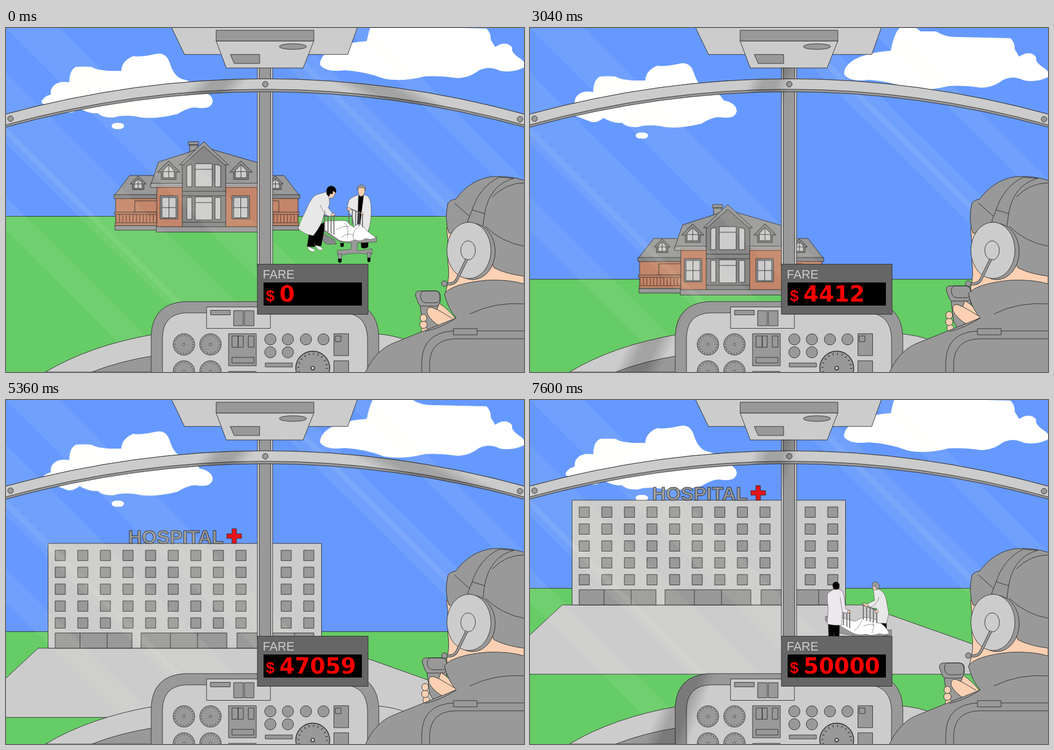
These frames come from a looping animation (917x611 px, 7680 ms). An HTML page without scripts:

```html
<!DOCTYPE html>
<html lang="en">
<head>
<meta charset="utf-8">
<title>Air ambulance fare</title>
<style>
@property --n { syntax: "<integer>"; inherits: true; initial-value: 0; }
html, body { margin: 0; width: 100%; height: 100%; overflow: hidden; background: #69f; }
svg { position: absolute; left: 0; top: 0; }
.ln { stroke: #2b2b2b; stroke-width: .9; stroke-linejoin: round; }
.fine { stroke-width: .5; }
.l { fill: #ccc; } .m { fill: #999; } .d { fill: #888; } .n { fill: none; }
.brick { fill: #c4866a; } .skin { fill: #fbd0b3; } .coat { fill: #e8e8e8; } .k { fill: #000; }
.rail { fill: none; stroke: #6a6a6a; stroke-width: 1.7; }
.label { font: 21.5px "Liberation Sans", Arial, sans-serif; fill: #ccc; }
.sign { font: bold 34px "Liberation Sans", Arial, sans-serif; }
.cash { font: bold 28px "Liberation Sans", Arial, sans-serif; fill: red; }
.num {
  position: absolute; left: 484px; top: 453px; color: red;
  font: bold 39px/39px "DejaVu Sans", sans-serif; counter-reset: n var(--n);
}
.num::after { content: counter(n); }

.num, #clouds, #home, #dest, #load, #unload, #rotor, #grip, #hand {
  animation: 7.68s linear -2ms infinite;
}
.num { animation-name: fare; }
#clouds { animation-name: clouds; }
#home { animation-name: leave; }
#dest { animation-name: arrive; }
#load { animation-name: load; }
#unload { animation-name: unload; }
#rotor { animation-name: spin; }
#grip { animation-name: pull; --dx: 12px; --dy: -9px; }
#hand { animation-name: pull; --dx: 3px; --dy: -5px; }

@keyframes fare {
  0%, 36.4583% { --n: 0; animation-timing-function: steps(34); }
  71.875%, 100% { --n: 50000; }
}
@keyframes clouds {
  0%, 34.375% { transform: translateY(0); animation-timing-function: cubic-bezier(.3, 0, .75, .85); }
  46.875% { transform: translateY(53px); animation-timing-function: steps(13); }
  60.4167% { transform: translateY(75px); }
  62.5% { transform: translateY(77px); animation-timing-function: cubic-bezier(.3, .2, .5, 1); }
  73.4375%, 100% { transform: translateY(0); }
}
@keyframes leave {
  0%, 34.375% { transform: translateY(0); animation-timing-function: cubic-bezier(.45, 0, .8, .8); }
  45.8333%, 100% { transform: translateY(430px); }
}
@keyframes arrive {
  0%, 62.5% { transform: translateY(470px); animation-timing-function: cubic-bezier(.2, .2, .55, 1); }
  73.9583%, 100% { transform: translateY(0); }
}
@keyframes load {
  0% { transform: translate(0, 0) scale(1); animation-timing-function: steps(10); }
  10.4167% { transform: translate(-175px, -132px) scale(1.458); animation-timing-function: steps(6); }
  16.6667% { transform: translate(-337px, -253px) scale(1.88); animation-timing-function: steps(14); }
  31.25%, 100% { transform: translate(-708px, -531px) scale(2.848); }
}
@keyframes unload {
  0%, 73.9583% { transform: translate(-705px, -649px) scale(2.867); animation-timing-function: steps(24); }
  98.9583%, 100% { transform: translate(0, 0) scale(1); }
}
@keyframes spin {
  0%, 21.875% { transform: rotate(-54deg); animation-timing-function: cubic-bezier(.5, 0, .8, .6); }
  31.25% { transform: rotate(-182deg); animation-timing-function: steps(15); }
  46.875% { transform: rotate(-648deg); animation-timing-function: steps(13); }
  60.4167% { transform: rotate(-1021deg); animation-timing-function: cubic-bezier(.2, .4, .6, 1); }
  72.9167%, 100% { transform: rotate(-1244deg); }
}
@keyframes pull {
  0%, 32.2917% { transform: translate(0, 0); }
  35.4167%, 70.8333% { transform: translate(var(--dx), var(--dy)); }
  73.9583%, 100% { transform: translate(0, 0); }
}
</style>
</head>
<body>
<svg width="917" height="611" viewBox="0 0 917 611">
<defs>
  <pattern id="panes" x="86" y="189" width="40" height="30" patternUnits="userSpaceOnUse">
    <rect class="m ln" x="1" y="1" width="18" height="18.5"/>
  </pattern>
  <g id="dial">
    <circle class="m ln" r="19"/>
    <circle class="n" r="16" stroke="#333" stroke-width="2.4" stroke-dasharray=".8 4.23"/>
    <circle class="l ln" r="2"/>
  </g>
  <circle id="knob" class="m ln" r="10"/>
  <g id="wing" class="ln">
    <path class="brick" d="M194 302h75v50h-75z"/>
    <path class="n" d="M228 307h40v20h-40z"/>
    <path class="m" d="M192 297L219 262H272V297z"/>
    <path class="d" d="M191 296h79v7h-79z"/>
    <path class="brick" d="M192 327h77v4h-77zM193 346h76v5h-76z"/>
    <path class="n" stroke-dasharray="1.6 4.4" d="M194 338.500H268" style="stroke-width:15;stroke:#80523d"/>
    <path class="m" d="M193 351h76v8h-76z"/>
    <path class="d" d="M234 263L220 277H224V287H244V277H248z"/>
    <path class="l" d="M227 275L234 268L241 275V285H227zM234 268V285M227 277H241"/>
  </g>
  <g id="bay" class="ln">
    <path class="d" d="M288 236L268 256H275V269H301V256H308z"/>
    <path class="l" d="M278 253L288 243L298 253V266H278zM288 243V266M278 255H298"/>
    <path class="m" d="M273 298h31v41h-31z"/>
    <path class="l" d="M276 301h25v36h-25zM288.500 301V337M276 319H301"/>
  </g>
</defs>

<rect width="917" height="611" fill="#69f"/>
<g id="clouds" fill="#fff" stroke="#fff" stroke-width="8" stroke-linejoin="round">
  <path d="M67 131Q73 122 84 122Q80 107 94 101Q104 98 116 102Q115 78 125 73Q138 72 150 73Q165 82 208 80Q207 62 226 54Q240 56 262 51Q280 45 286 63Q294 90 312 95Q332 99 340 115Q361 119 362 130Q360 140 342 138Q326 134 302 149Q256 160 230 153Q205 150 190 155Q172 156 164 147Q150 150 130 138Q118 148 110 146Q90 138 67 131z"/>
  <path d="M560 64Q560 52 577 42Q600 30 642 27Q650 -16 662 -17Q680 -18 690 -7L718 -7Q735 4 760 3L849 5Q855 12 854 22Q862 34 864 40Q882 26 892 36Q890 46 910 59Q918 66 912 68Q895 76 875 72Q855 62 835 72Q820 84 800 85Q770 80 740 82Q700 92 670 86Q640 74 600 71Q570 75 560 64z"/>
  <ellipse cx="198" cy="174" rx="7" ry="1.500"/>
  <ellipse cx="264" cy="-78" rx="30" ry="11"/>
</g>

<g id="home">
  <path class="ln" fill="#6c6" d="M-2 334.500H920V1100H-2z"/>
  <use href="#wing"/>
  <use href="#wing" transform="matrix(-1 0 0 1 711 0)"/>
  <g class="ln">
    <path class="brick" d="M267 280h179v74h-179z"/>
    <path class="m" d="M325 207h14v24h-14zM323 202h18v6h-18z"/>
    <path class="m" d="M256 279L270 238L323 221L350 210L366 216L445 239V279z"/>
    <path class="l" fill-opacity=".6" d="M256 276h190v7h-190z"/>
    <path class="d" d="M312 240L350 205L389 240V354H312z"/>
    <path class="m" d="M350 202L307 243H314L350 210L387 243H394z"/>
    <path class="l" d="M335 241h30v41h-30zM320 245l9-3v40h-9zM370 242l10 3v37h-10zM335 300h30v41h-30zM320 301h9v39h-9zM370 301h10v39h-10zM335 251H365M335 310H365"/>
    <path class="n" d="M312 290H389M312 298H389M312 345H389"/>
    <path class="m" d="M266 353h180v9.500h-180z"/>
  </g>
  <use href="#bay"/>
  <use href="#bay" transform="matrix(-1 0 0 1 704 0)"/>

  <g id="load" class="ln fine">
    <path class="k" d="M621 335H642L641 389Q635 393 629 390L628 375L622 380z"/>
    <path class="coat" d="M622 297L638 297Q645 301 646 314Q648 340 641 362H618L613 335L603 322L607 306Q612 300 622 297z"/>
    <path class="k" d="M624 298H633L629 330L626 355H622z"/>
    <path class="skin" d="M623 284Q629 279 635 284L635 292Q632 300 627 299Q623 295 623 284z"/>
    <path class="m" d="M622 288Q621 279 629 278.500Q638 279 636 289L634 284H624z"/>
    <path class="d" d="M558 363L581 376L585 384H568Q559 381 558 363z"/>
    <path class="m" d="M559 358L565 356L596 373L650 371H656V380L622 382V396L648 392V402H642Q618 398 596 403H587L586 395L611 393V382L590 379z"/>
    <path class="m" d="M588 401h7l-1 9h-5zM639 399h7l-1 9h-5z"/>
    <path class="k" d="M588 410h6v5q-3 4-6 0zM640 408h5v6q-3 4-5 0zM592 382h6v5q-3 4-6 0z"/>
    <path fill="#fff" d="M564 343L592 342Q606 341 608 349L616 354Q622 346 630 349Q636 360 655 372Q648 377 636 374Q627 381 618 376Q604 383 590 377L563 358z"/>
    <path class="n" d="M600 346Q608 358 604 372M585 358Q598 350 608 353M615 376Q612 362 624 353M594 372Q604 362 616 368"/>
    <path class="rail" d="M607 320V347M613 322V349M619 324V351M625 326V352M631 329V354M605 319L633 331"/>
    <path class="skin" d="M604 319q5-1 7 3l-5 3zM628 327q4 0 5 4l-4 1z"/>
    <path class="k" d="M537 362L563 345L564 355L558 387H547L547 379L546 389L533 388Q535 376 537 362z"/>
    <path fill="#fff" d="M534 388Q540 390 547 394Q548 398 541 397Q533 394 534 388zM547 386Q555 386 561 392Q560 396 553 394z"/>
    <path class="rail" d="M564 332V359M570 332V362M575.500 333V365M580.500 334V367M562 331L582 333"/>
    <path class="skin" d="M568 288L583 286L583 294L579 301L571 303L566 294z"/>
    <path class="coat" d="M567 291L572 302Q574 315 570 319L578 329L574 335L563 331Q560 349 544 369Q528 367 517 356Q522 340 531 324Q540 300 550 296z"/>
    <path class="n" d="M556 314Q560 325 568 333M563 331L565 324"/>
    <path class="skin" d="M576 330Q582 327 583 332L575 335z"/>
    <path class="k" d="M568 296Q565 281 576 280.500Q586 282 584 293L579 289L578 295L574 294L572 299z"/>
  </g>
</g>

<g id="dest">
  <path class="ln" fill="#6c6" d="M-2 334.500H920V1100H-2z"/>
  <path class="ln l" d="M57 364H588L920 482V487H-2V419z"/>
  <path class="ln l" d="M74.500 178H558.500V364H74.500z"/>
  <rect x="86" y="189" width="462" height="150" fill="url(#panes)"/>
  <path class="ln m" d="M87 337H223V364H87zM131 337V364M179 337V364M239 337H391V364H239zM291 337V364M339 337V364M409 337H545V364H409zM460 337V364M511 337V364"/>
  <text class="sign m ln" x="216" y="178">HOSPITAL</text>
  <path class="ln" fill="#e8141c" d="M400 152h8v9h9v8h-9v9h-8v-9h-9v-8h9z"/>

  <g id="unload" class="ln fine">
    <path class="k" d="M614 394H631L632 434H625L622 410L619 434H614z"/>
    <path class="m" d="M523 384H533L575 412L636 408H640V418L590 422L548 414L523 392zM585 421H595V432H585zM560 433Q590 426 622 432V438H562z"/>
    <path class="k" d="M562 438h5v5h-5zM616 438h5v5h-5z"/>
    <path fill="#fff" d="M548 386L575 393L590 386Q606 386 614 392Q630 400 636 415Q628 418 618 415Q606 420 594 416Q580 420 566 411L540 396z"/>
    <path class="n" d="M588 390Q584 402 574 410M604 389Q612 402 605 414M590 402Q600 396 610 400"/>
    <path class="skin" d="M606 330H614L615 338L609 341z"/>
    <path class="coat" d="M608 338L617 336Q628 340 631 356L635 380L631 397L613 396L614 370L599 369L595 363L610 356Z"/>
    <path class="n" d="M618 350Q614 365 600 369"/>
    <path class="m" d="M606 331Q604 323 612 323Q620 325 618 334L614 337L611 331z"/>
    <path class="rail" d="M590 363V390M596 365V392M602 368V394M608 371V395M614 374V396M588 361L615 375"/>
    <path class="skin" d="M588 362Q593 359 599 364L597 368zM611 373q5-1 6 4l-5 2z"/>
    <path class="rail" d="M555 374V400M561 375V403M566 376V405"/>
    <path class="k" d="M528 396H548L547 436H539L538 412L537 436H529z"/>
    <path class="skin" d="M537 332H548V340H537z"/>
    <path fill="#ece8ee" d="M536 337L548 336Q555 340 556 350L559 371L567 374L565 379L553 377L552 400Q538 401 526 398L528 370Q525 352 527 343z"/>
    <path class="n" d="M549 350L553 377"/>
    <path class="skin" d="M562 374q5-1 6 2l-5 3z"/>
    <path class="k" d="M536 331Q535 323 542 323Q549 324 547.500 332L546 336H538z"/>
  </g>
</g>

<g transform="skewX(45)" fill="#ffffdc" fill-opacity=".07">
  <rect x="-360" width="60" height="611"/>
  <rect x="-205" width="125" height="611"/>
  <rect x="-190" width="14" height="611"/>
  <rect x="0" width="95" height="611"/>
  <rect x="430" width="70" height="611"/>
  <rect x="455" width="14" height="611"/>
  <rect x="600" width="48" height="611"/>
</g>

<g class="ln">
  <path id="dashL" class="l" d="M70 611Q148 564 262 544V611z"/>
  <path class="m" d="M152 611Q200 592 262 582V611z"/>
  <path id="dashR" class="l" d="M655 543Q690 546 712 556L690 611H655z"/>
  <path class="m" d="M655 582L690 590V611H655z"/>
  <path id="post" class="l" d="M445 70H472V425H445z"/>
  <path class="m" d="M448.500 70H468.500V425H448.500z"/>
  <path id="beam" class="m" d="M-2 153.500Q459 27 919 153.500V176.500Q459 50 -2 176.500z"/>
  <path class="l" d="M-2 153.500Q459 27 919 153.500V172.500Q459 45 -2 172.500z"/>
  <g class="m"><circle cx="8" cy="161" r="5"/><circle cx="459" cy="100" r="5"/><circle cx="910" cy="162" r="5"/></g>
  <path class="l" d="M293 -1H622L605 47H316z"/>
  <path class="l" d="M372 23H545L526 71H390z"/>
  <path class="m" d="M372 4H545V23H372zM397 47H449V63H404z"/>
  <ellipse class="m" cx="508" cy="33" rx="24" ry="5"/>

  <path id="panel" class="m" d="M257 612V545Q260 490 315 486H600Q658 490 660 548V612z"/>
  <path class="l" d="M277 612V548Q279 508 318 506H600Q638 509 640 550V612z"/>
  <path class="l" d="M355 495.500H468V533.500H355z"/>
  <path class="m" d="M362 501.500h35v8h-35zM403 502h17v27h-17zM422 502h17v27h-17z"/>
  <path class="m" d="M394 543h49v57h-49zM400 547h11v20h-11zM411 547h9v20h-9zM429 547h10v20h-10zM400 585h39v10h-39zM394 610h49v4h-49zM459 595h48v7h-48z"/>
  <path class="m" d="M580.500 543h26v39h-26zM583 547h10v10h-10zM580.500 591h26v22h-26z"/>
</g>
<use href="#dial" x="315" y="562"/><use href="#dial" x="362" y="562"/>
<use href="#dial" x="315" y="610"/><use href="#dial" x="362" y="610"/>
<use href="#dial" transform="translate(543 604) scale(1.58)"/>
<use href="#knob" x="468" y="553"/><use href="#knob" x="499" y="553"/>
<use href="#knob" x="531" y="553"/><use href="#knob" x="562" y="553"/>
<use href="#knob" x="468" y="576"/><use href="#knob" x="499" y="576"/>

<path id="meter" class="ln" fill="#666" d="M445 419.500H641V508.500H445z"/>
<path class="k" d="M456 452H630V493H456z"/>
<text class="label" x="454.500" y="445">FARE</text>
<text class="cash" x="460" y="485">$</text>

<g class="ln">
  <path class="skin" d="M780 355Q784 390 782 415Q787 440 778 470L850 460L917 460V425L850 380z"/>
  <path class="m" d="M784 364Q776 342 782 312Q786 305 796 304Q822 269 860 264Q892 262 919 271V441Q885 437 864 426L840 380z"/>
  <path class="n" d="M794 311L830 343M861 300Q885 275 919 275M848 352Q878 381 919 388"/>
  <path class="m" d="M824 326Q838 282 873 265L899 267Q856 278 847 331L844 354L817 344z"/>
  <path class="n" d="M825 323L848 330"/>
  <ellipse class="m" cx="826" cy="397" rx="40" ry="50"/>
  <ellipse class="l" cx="819.500" cy="395" rx="39" ry="50"/>
  <ellipse class="l" cx="818" cy="395" rx="13" ry="17"/>
  <path class="n" d="M816 410L798 447Q792 457 778 454" style="stroke-width:5"/>
  <path class="n" d="M816 410L798 447Q792 457 778 454" style="stroke:#999;stroke-width:3.400"/>
  <circle class="m" cx="776" cy="454" r="5"/>

  <g id="grip">
    <path class="m" d="M733 492L738 530L746 545L772 535L767 488z"/>
    <path class="m" d="M732 467H760Q769 467 769 476V484Q769 490 763 494H737Q732 494 730 489L725 476Q724 467 732 467z"/>
    <path class="n" d="M740 467H760Q767 468 768 476V482Q767 488 760 488H743Q735 487 734 478Q733 468 740 467z"/>
  </g>
  <g id="hand" class="skin">
    <path d="M746 508Q743 496 753 496L763 500L767 489Q784 500 797 518L770 531Q754 522 746 508z"/>
    <path class="n" d="M763 500Q778 508 790 516"/>
    <ellipse cx="741" cy="538" rx="6" ry="6.500"/>
    <ellipse cx="739" cy="527" rx="6.500" ry="6.500"/>
    <ellipse cx="739" cy="515" rx="6" ry="6.500"/>
  </g>
  <path id="jacket" class="m" d="M776 472Q790 454 850 448Q890 446 919 455V612H636Q655 570 690 558L797 515Q782 498 776 472z"/>
  <path class="n" d="M797 515Q770 533 742 539M821 508Q865 486 919 490"/>
  <path class="m" d="M736 612V592Q738 540 794 538H919V612z"/>
  <path class="n" d="M750 612V594Q752 553 796 552H919"/>
  <path class="m" d="M792 534H834V545H792z"/>
</g>
</svg>

<div class="num"></div>

<svg width="917" height="611" viewBox="0 0 917 611">
<defs>
  <clipPath id="cabin">
    <use href="#beam"/><use href="#post"/><use href="#panel"/><use href="#meter"/>
    <use href="#jacket"/><use href="#dashL"/><use href="#dashR"/>
  </clipPath>
  <linearGradient id="soft">
    <stop offset="0" stop-opacity="0"/>
    <stop offset=".35" stop-opacity=".2"/>
    <stop offset=".65" stop-opacity=".2"/>
    <stop offset="1" stop-opacity="0"/>
  </linearGradient>
  <rect id="blade" x="-29" y="50" width="58" height="1200" fill="url(#soft)"/>
</defs>
<g clip-path="url(#cabin)">
  <g transform="translate(470) scale(1.3 1)">
    <g id="rotor">
      <use href="#blade"/>
      <use href="#blade" transform="rotate(90)"/>
      <use href="#blade" transform="rotate(180)"/>
      <use href="#blade" transform="rotate(270)"/>
    </g>
  </g>
</g>
</svg>
</body>
</html>
```
